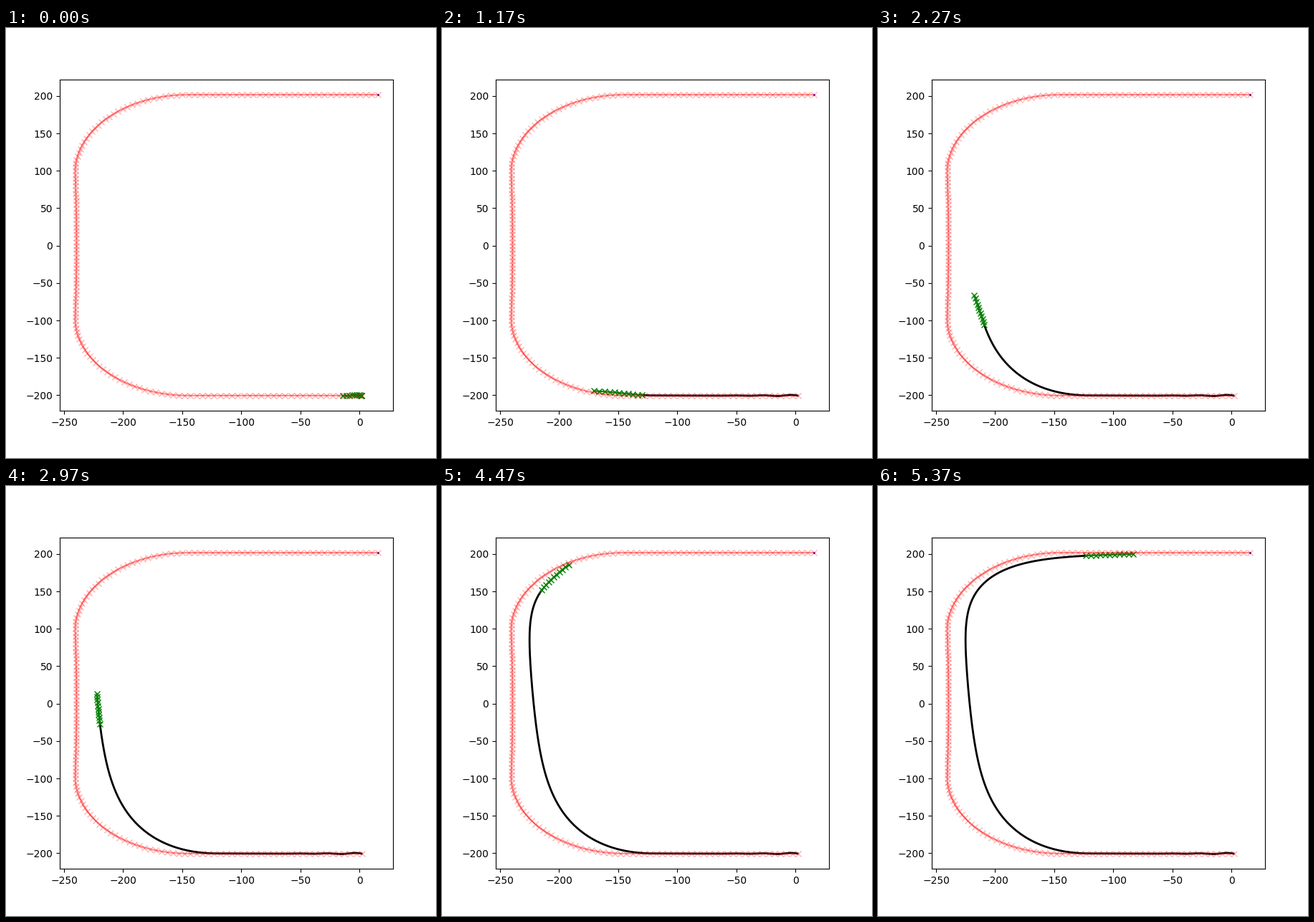
A matplotlib script that plays this animation: 600 by 600 pixels, repeating every 5.41 s.

```python
import numpy as np
import matplotlib.pyplot as plt
from matplotlib.animation import FuncAnimation

FRAMES, LOOP_MS = 162, 5410
STEP = 4.0                    # cruising distance per frame
LAG = 8.6                     # distance lost while speeding up
HORIZON = 10                  # predicted steps ahead
START_X, END_X = 2.1, 15.4
LOW, HIGH = -200.5, 201.7


def arc_length(pts):
    return np.concatenate([[0], np.cumsum(np.hypot(*np.diff(pts, axis=0).T))])


def along(pts, dist, s):
    return np.column_stack([np.interp(s, dist, c) for c in pts.T])


def make_course(spacing=5, bend_x=-145, rx=95.6, ry=103):
    """Reference track: straight, bend, slightly bowed side, bend, straight."""
    a = np.linspace(0, np.pi / 2, 80)
    y = np.linspace(LOW + ry, HIGH - ry, 100)
    bow = bend_x - rx + 1.1 * (1 - (y / y[-1]) ** 2)
    pts = np.vstack([
        [[START_X, LOW]],
        np.column_stack([bend_x - rx * np.sin(a), LOW + ry * (1 - np.cos(a))]),
        np.column_stack([bow, y]),
        np.column_stack([bend_x - rx * np.cos(a), HIGH - ry * (1 - np.sin(a))]),
        [[END_X, HIGH]],
    ])
    dist = arc_length(pts)
    return along(pts, dist, np.linspace(0, dist[-1], round(dist[-1] / spacing) + 1))


def make_path(ds=0.5, length=690):
    """Driven track, integrated from its heading over distance."""
    s = np.arange(0, length, ds)
    u = np.maximum(s + ds / 2 - 114, 0) / 40
    turn = 87.3 * (1 - (1 + u) * np.exp(-u))              # damped first bend
    turn += 91 / (1 + np.exp((545 - s - ds / 2) / 26))    # S-shaped second bend
    turn = np.radians(turn)
    x = START_X - np.cumsum(np.cos(turn)) * ds
    y = LOW + np.cumsum(np.sin(turn)) * ds
    y += 1.1 * np.sin(2 * np.pi * s / 23) * np.exp(-s / 25)   # starting wobble
    return s, np.column_stack([x, y])


course = make_course()
path_s, path = make_path()


def travelled(k):
    return STEP * k - LAG * (1 - np.exp(-k * STEP / LAG))


def bump(k, centre, width):
    return np.exp(-((k - centre) / width) ** 2)


def prediction(k):
    """Steps ahead on the path; in bends the far end drifts outwards."""
    j = np.arange(HORIZON + 1)
    lag = np.exp(-k / 8.2)
    s = travelled(k) + STEP * (1 - lag) * j + 0.16 * lag * j**2
    pos = along(path, path_s, s)
    head = along(path, path_s, s + 1) - along(path, path_s, s - 1)
    head /= np.hypot(*head.T)[:, None]
    left = np.column_stack([-head[:, 1], head[:, 0]])
    drift = 16 * bump(k, 46, 15.5) + 6 * bump(k, 133, 8)
    weight = ((j / HORIZON) ** 2.5)[:, None]
    return pos + weight * (drift * left - 0.018 * drift**2 * head)


fig, ax = plt.subplots(figsize=(6, 6), dpi=100)
ax.set_xlim(-253.65, 28.3)
ax.set_ylim(-220.7, 221.9)

ax.plot(*course.T, "r-", alpha=0.2)
ax.plot(*course[-1], "b.", ms=2)
trail, = ax.plot([], [], "k-", lw=2)
plan, = ax.plot([], [], "gx-")
ax.plot(*course.T, "rx-", alpha=0.3)


def update(k):
    s = travelled(k)
    done = np.vstack([path[path_s < s], along(path, path_s, [s])])
    trail.set_data(*done.T)
    plan.set_data(*prediction(k).T)
    return trail, plan


anim = FuncAnimation(fig, update, frames=FRAMES, interval=LOOP_MS / FRAMES,
                     repeat=True, repeat_delay=0)
plt.show()
```
